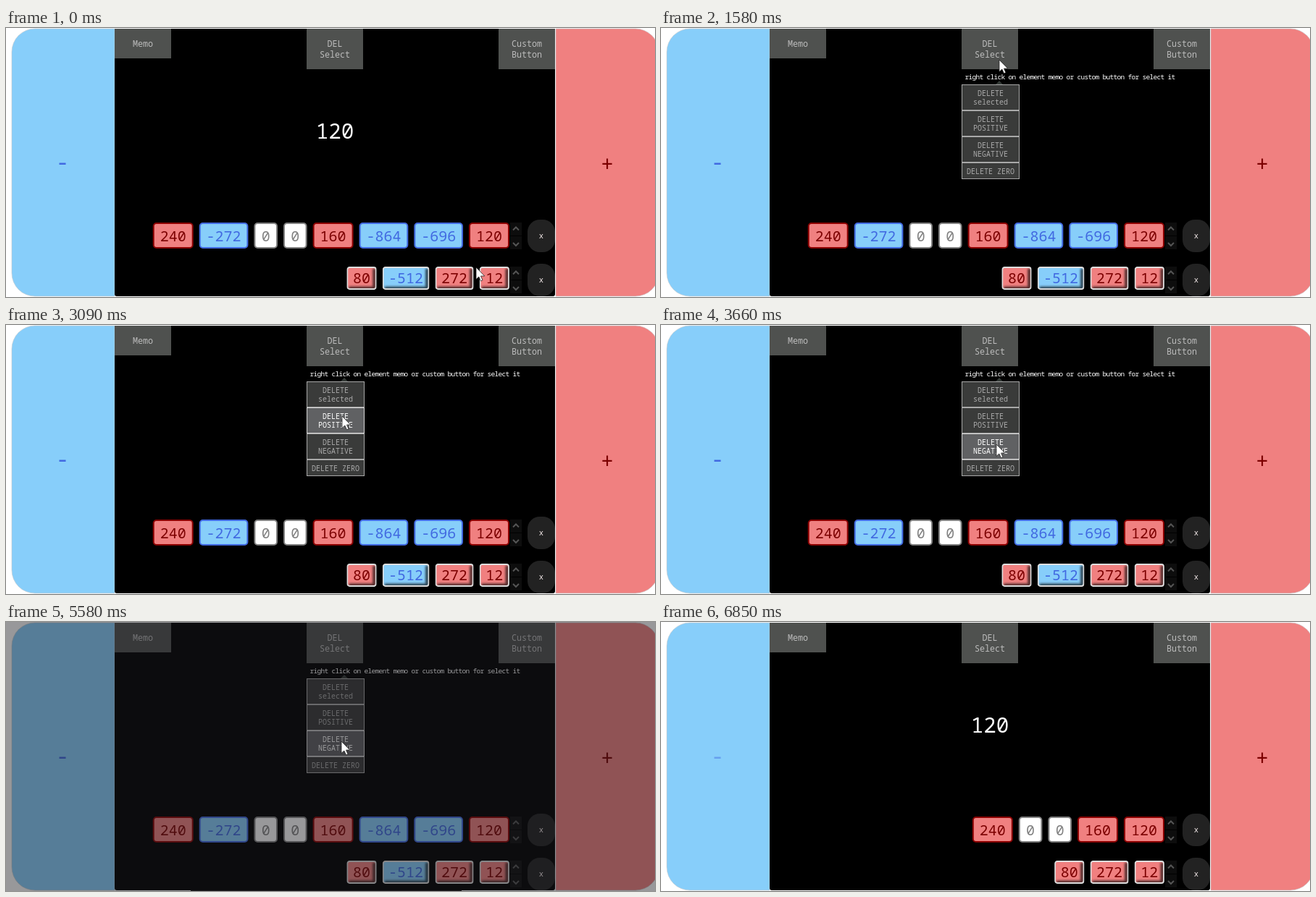
Animation, 896 px wide and 372 px high, one loop 8 s. Source, as an HTML page:

```html
<!DOCTYPE html>
<html lang="en">
<head>
<meta charset="utf-8">
<title>Counter memo</title>
<style>
html, body { margin: 0; width: 100%; height: 100%; overflow: hidden; background: #fff; }
svg { display: block; }
text { font-family: "Noto Sans Mono", "DejaVu Sans Mono", monospace; text-anchor: middle; }
</style>
</head>
<body>
<svg id="stage" width="896" height="372" viewBox="0 0 896 372">
  <defs>
    <filter id="soft" x="-30%" y="-30%" width="160%" height="160%"><feGaussianBlur stdDeviation="1.6"/></filter>
  </defs>
</svg>
<script>
const LOOP = 8000, STEP = 70;
const NS = 'http://www.w3.org/2000/svg';
const stage = document.getElementById('stage');
const RED = ['#f08080', '#8b0000', '#7c0000'];
const BLUE = ['#87cefa', '#4169e1', '#4169e1'];
const WHITE = ['#ffffff', '#808080', '#808080'];

function el(parent, tag, attrs) {
  const node = document.createElementNS(NS, tag);
  for (const k in attrs) node.setAttribute(k, attrs[k]);
  parent.appendChild(node);
  return node;
}
const group = (parent = stage) => el(parent, 'g', {});
const rect = (p, x, y, width, height, fill, more) =>
  el(p, 'rect', { x, y, width, height, fill, ...more });
function label(p, str, x, y, size, fill, more) {
  const node = el(p, 'text', { x, y, 'font-size': size, fill, ...more });
  node.textContent = str;
  return node;
}
const show = (node, on) => node.setAttribute('visibility', on ? 'visible' : 'hidden');

// Panels
const edge = { stroke: '#c4c8cc', 'stroke-width': 0.6 };
el(stage, 'path', { d: 'M150 1H40A32 32 0 0 0 8 33V339A32 32 0 0 0 40 371H150Z', fill: BLUE[0], ...edge });
el(stage, 'path', { d: 'M759 1H869A32 32 0 0 1 901 33V339A32 32 0 0 1 869 371H759Z', fill: RED[0], ...edge });
rect(stage, 150, 1, 608, 370, '#000', { rx: 3 });
const minus = label(stage, '-', 78, 196, 30, BLUE[1]);
label(stage, '+', 830, 199, 30, RED[2]);

// Top buttons
function topButton(x, lines) {
  rect(stage, x, 1, 78, 26 + 15 * lines.length, '#4f514f');
  lines.forEach((s, i) => label(stage, s, x + 39, 26 + 15 * i, 11.7, '#bcbcbc'));
}
topButton(150, ['Memo']);
topButton(415, ['DEL', 'Select']);
topButton(680, ['Custom', 'Button']);
const total = label(stage, '120', 454, 152.5, 29.3, '#fff');

// Number chips, laid out from the right edge
const palette = n => n > 0 ? RED : n < 0 ? BLUE : WHITE;

function memoChip(p, n, x, w) {
  const [fill, line, ink] = palette(n);
  rect(p, x + 1, 270, w - 2, 34, fill, { rx: 4, stroke: line, 'stroke-width': 2 });
  label(p, n, x + w / 2, 295.3, 20, ink);
}
function customChip(p, n, x, w) {
  const [fill, , ink] = palette(n);
  const box = el(p, 'svg', { x, y: 330, width: w, height: 32 });
  rect(box, 1, 1, w - 2, 30, fill, { rx: 3 });
  el(box, 'path', {
    d: `M3 30H${w - 3}V3`, fill: 'none', stroke: '#000', 'stroke-width': 5,
    opacity: 0.65, filter: 'url(#soft)'
  });
  rect(box, 1, 1, w - 2, 30, 'none', { rx: 3, stroke: '#dedede', 'stroke-width': 1.8 });
  label(p, n, x + w / 2, 353.3, 20, ink);
}
function chipRow(p, nums, draw, pad) {
  let x = 695;
  for (const n of [...nums].reverse()) {
    const w = pad + 11.7 * String(n).length;
    x -= w;
    draw(p, n, x, w);
    x -= 8;
  }
}
const memo = [240, -272, 0, 0, 160, -864, -696, 120];
const custom = [80, -512, 272, 12];
function chips(keep) {
  const g = group();
  chipRow(g, memo.filter(keep), memoChip, 20.9);
  chipRow(g, custom.filter(keep), customChip, 18);
  return g;
}
const allChips = chips(() => true);
const keptChips = chips(n => n >= 0);

// Row controls
for (const y of [287.5, 348.5]) {
  rect(stage, 696, y - 18.5, 16, 18, '#0d0d0d');
  rect(stage, 696, y + 0.5, 16, 18, '#0d0d0d');
  el(stage, 'path', {
    d: `M700 ${y - 8}l4-4l4 4M700 ${y + 9.5}l4 4l4-4`,
    fill: 'none', stroke: '#555', 'stroke-width': 2
  });
  rect(stage, 720, y - 22.5, 38, 45, '#222', { rx: 17 });
  label(stage, 'x', 739, y + 3.5, 10.5, '#f2e8e8');
}

// Delete menu
const menu = group();
label(menu, 'right click on element memo or custom button for select it', 419.5, 71, 9.5, '#fff',
  { 'letter-spacing': -0.7, style: 'text-anchor:start' });
el(menu, 'path', { d: 'M461 79L467 73L473 79Z', fill: '#343a37' });
const items = [
  [78, 36, 'DELETE', 'selected'],
  [114, 36, 'DELETE', 'POSITIVE'],
  [150, 36, 'DELETE', 'NEGATIVE'],
  [186, 23, 'DELETE ZERO']
].map(([y, h, ...lines]) => ({
  y, h,
  box: rect(menu, 415.5, y + 0.5, 79, h - 1, '#3a3b3a', { stroke: '#a9a9a9' }),
  text: lines.map((s, i) => label(menu, s, 455, y + 15.5 + 12.8 * i, 10, '#aaa'))
}));

// Modal shade, click mark and pointer
const shade = group();
rect(shade, 0, 0, 896, 372, 'rgb(28,28,32)', { opacity: 0.45 });
rect(shade, 255, 371, 374, 1, '#1b1b1d');
const press = el(stage, 'circle', { cx: 463, cy: 165, r: 12.5, fill: '#e6dc1e' });
const pointer = el(stage, 'path', {
  d: 'M0 0V16.5L3.8 13L6.5 18.8L9 17.7L6.5 12H11.7Z',
  fill: '#fff', stroke: '#111', 'stroke-width': 0.7
});

// Pointer path: time, x, y
const path = [
  [0, 649, 331], [670, 649, 331], [1230, 472, 59], [1510, 467, 45], [1580, 467, 44],
  [2040, 467, 44], [2460, 465, 82], [2880, 464, 111], [3650, 463, 165],
  [6040, 463, 165], [6250, 497, 341], [LOOP, 497, 341]
];
// The pointer is sampled in steps counted from the start of each move
function sampled(t) {
  const start = t < 740 ? 0 : t < 2110 ? 740 : t < 6110 ? 2110 : 6110;
  return start ? start + STEP * Math.floor((t - start) / STEP) : 0;
}
function pointerAt(time) {
  const t = sampled(time);
  const i = Math.max(1, path.findIndex(k => k[0] >= t));
  const [t0, x0, y0] = path[i - 1], [t1, x1, y1] = path[i];
  let u = (t - t0) / (t1 - t0);
  if (t1 === 1230) u = u * u * (3 - 2 * u);
  return [Math.round(x0 + (x1 - x0) * u), Math.round(y0 + (y1 - y0) * u)];
}

function draw(t) {
  const done = t >= 6850;
  const open = t >= 1300 && !done;
  const [x, y] = pointerAt(t);

  show(menu, open);
  show(total, !open);
  show(allChips, !done);
  show(keptChips, done);
  minus.setAttribute('opacity', done ? 0.45 : 1);

  const hoverY = t >= 6040 ? 165 : y;
  for (const it of items) {
    const on = open && hoverY >= it.y && hoverY < it.y + it.h;
    it.box.setAttribute('fill', on ? '#606163' : '#3a3b3a');
    it.box.setAttribute('stroke', on ? '#d6d6d6' : '#a9a9a9');
    it.text.forEach(n => n.setAttribute('fill', on ? '#fff' : '#aaa'));
  }

  show(shade, t >= 5580 && !done);
  show(press, t >= 5450 && t < 5580);
  press.setAttribute('opacity', t < 5520 ? 0.75 : 0.4);
  show(pointer, t < 6320);
  pointer.setAttribute('transform', `translate(${x} ${y})`);
}

const begin = performance.now();
function tick() {
  draw((performance.now() - begin) % LOOP);
  requestAnimationFrame(tick);
}
tick();
</script>
</body>
</html>
```
